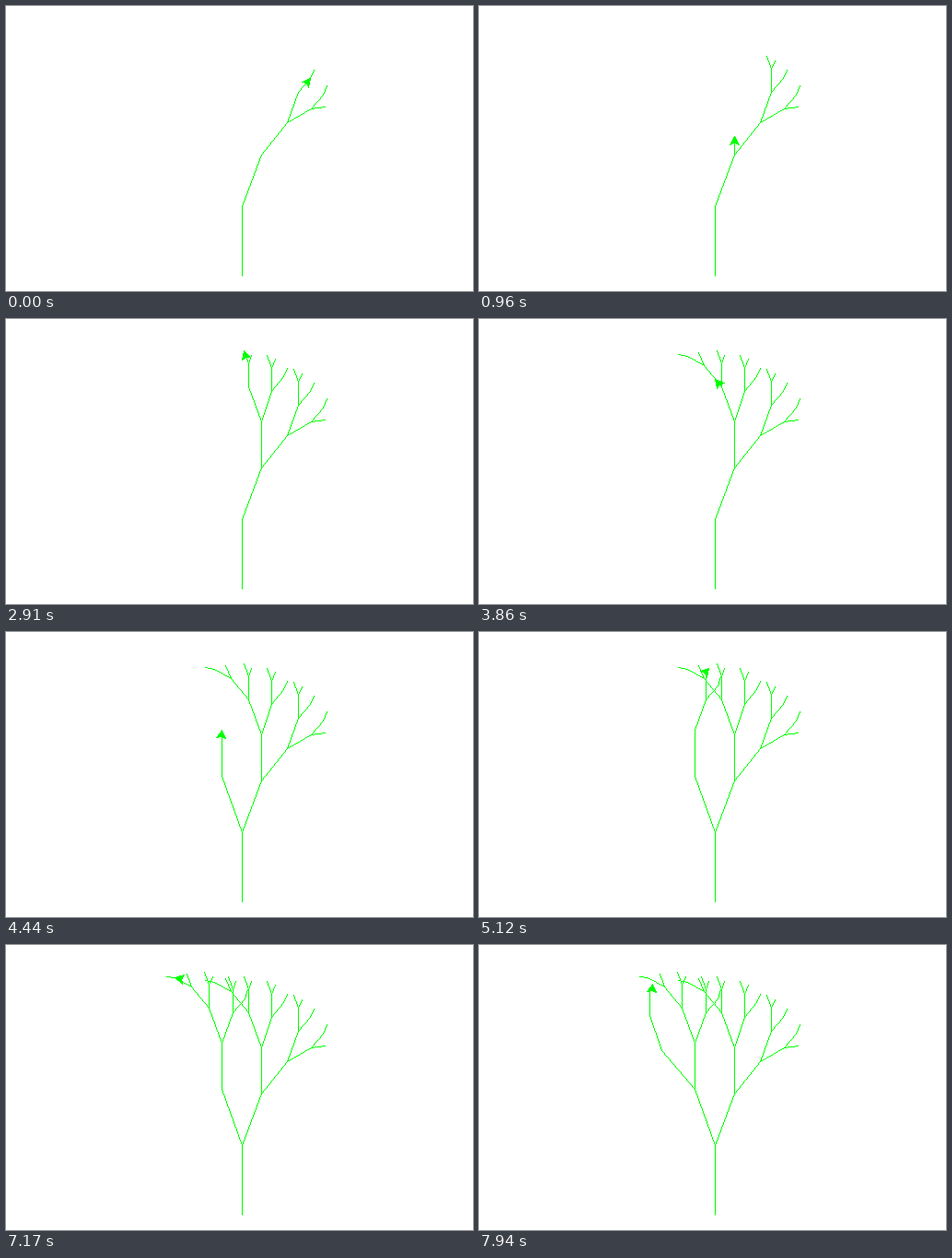
Recreate the animation shown at these times as an HTML page with a canvas. Size 507 px wide and 309 px high, loop 7.99 s.

```html
<!DOCTYPE html>
<html lang="en">
<head>
<meta charset="utf-8">
<title>Turtle tree</title>
<style>
  html, body { margin: 0; width: 100%; height: 100%; overflow: hidden; background: #fff; }
  canvas { display: block; }
</style>
</head>
<body>
<canvas id="stage" width="507" height="309"></canvas>
<script>
const ctx = document.getElementById('stage').getContext('2d');
const COLOR = '#00ff00';
const LOOP = 7990;
const FRAME = 26.7;
const FIRST = 145; // turtle updates done before the loop begins

// Turtle pace: [ms, updates since the loop began]
const PACE = [
  [0, 0], [1920, 170], [3860, 345], [5120, 456],
  [5870, 523], [7170, 639], [7940, 708], [LOOP, 708]
];

const ARROW = [[0, 0], [-5, -9], [0, -7], [5, -9]];
const segments = [];
const states = [];
const turtle = { x: 256, y: 292, heading: 0 };

function record(done, from) {
  states.push({ ...turtle, done, from });
}

function move(dist) {
  const a = turtle.heading * Math.PI / 180;
  const from = [turtle.x, turtle.y];
  const dx = Math.sin(a) * dist, dy = -Math.cos(a) * dist;
  const hops = 1 + Math.floor(Math.abs(dist) / (9 * 1.1 ** 3));
  const done = segments.length;
  const forward = dist > 0;
  if (forward) segments.push([from, [from[0] + dx, from[1] + dy]]);
  for (let i = 1; i <= hops; i++) {
    turtle.x = from[0] + dx * i / hops;
    turtle.y = from[1] + dy * i / hops;
    record(done, forward ? from : null);
  }
}

function turn(angle) {
  const steps = 1 + Math.floor(Math.abs(angle) / 9);
  for (let i = 0; i < steps; i++) {
    turtle.heading += angle / steps;
    record(segments.length, null);
  }
  record(segments.length, null); // the turtle rests one update after a turn
}

function tree(len) {
  if (len <= 5) return;
  move(len);
  turn(20);
  tree(len - 15);
  turn(-40);
  tree(len - 10);
  turn(20);
  move(-len);
}

// One-pixel line without smoothing
function line(a, b) {
  let [x, y] = a.map(Math.round);
  const [ex, ey] = b.map(Math.round);
  const dx = Math.abs(ex - x), dy = Math.abs(ey - y);
  const sx = Math.sign(ex - x), sy = Math.sign(ey - y);
  let err = dx - dy;
  for (;;) {
    ctx.fillRect(x, y, 1, 1);
    if (x === ex && y === ey) return;
    const e2 = 2 * err;
    if (e2 > -dy) { err -= dy; x += sx; }
    if (e2 < dx) { err += dx; y += sy; }
  }
}

function arrow({ x, y, heading }) {
  const a = heading * Math.PI / 180;
  const c = Math.cos(a), s = Math.sin(a);
  const pts = ARROW.map(([u, v]) => [
    Math.round(x + u * c + v * s),
    Math.round(y + u * s - v * c)
  ]);
  ctx.beginPath();
  pts.forEach(([px, py]) => ctx.lineTo(px + 0.5, py + 0.5));
  ctx.fill();
  pts.forEach((p, i) => line(p, pts[(i + 1) % pts.length]));
}

function updateAt(t) {
  let i = 0;
  while (i < PACE.length - 2 && t >= PACE[i + 1][0]) i++;
  const [t0, n0] = PACE[i], [t1, n1] = PACE[i + 1];
  const frames = Math.round((t1 - t0) / FRAME);
  const part = Math.floor((t - t0) / (t1 - t0) * frames) / frames;
  return FIRST + Math.floor(n0 + (n1 - n0) * part + 0.5);
}

function draw(t) {
  const state = states[updateAt(t)];
  ctx.fillStyle = '#fff';
  ctx.fillRect(0, 0, 507, 309);
  ctx.fillStyle = COLOR;
  for (let i = 0; i < state.done; i++) line(...segments[i]);
  if (state.from) line(state.from, [state.x, state.y]);
  arrow(state);
}

tree(75);
const start = performance.now();
function tick() {
  draw((performance.now() - start) % LOOP);
  requestAnimationFrame(tick);
}
tick();
</script>
</body>
</html>
```
